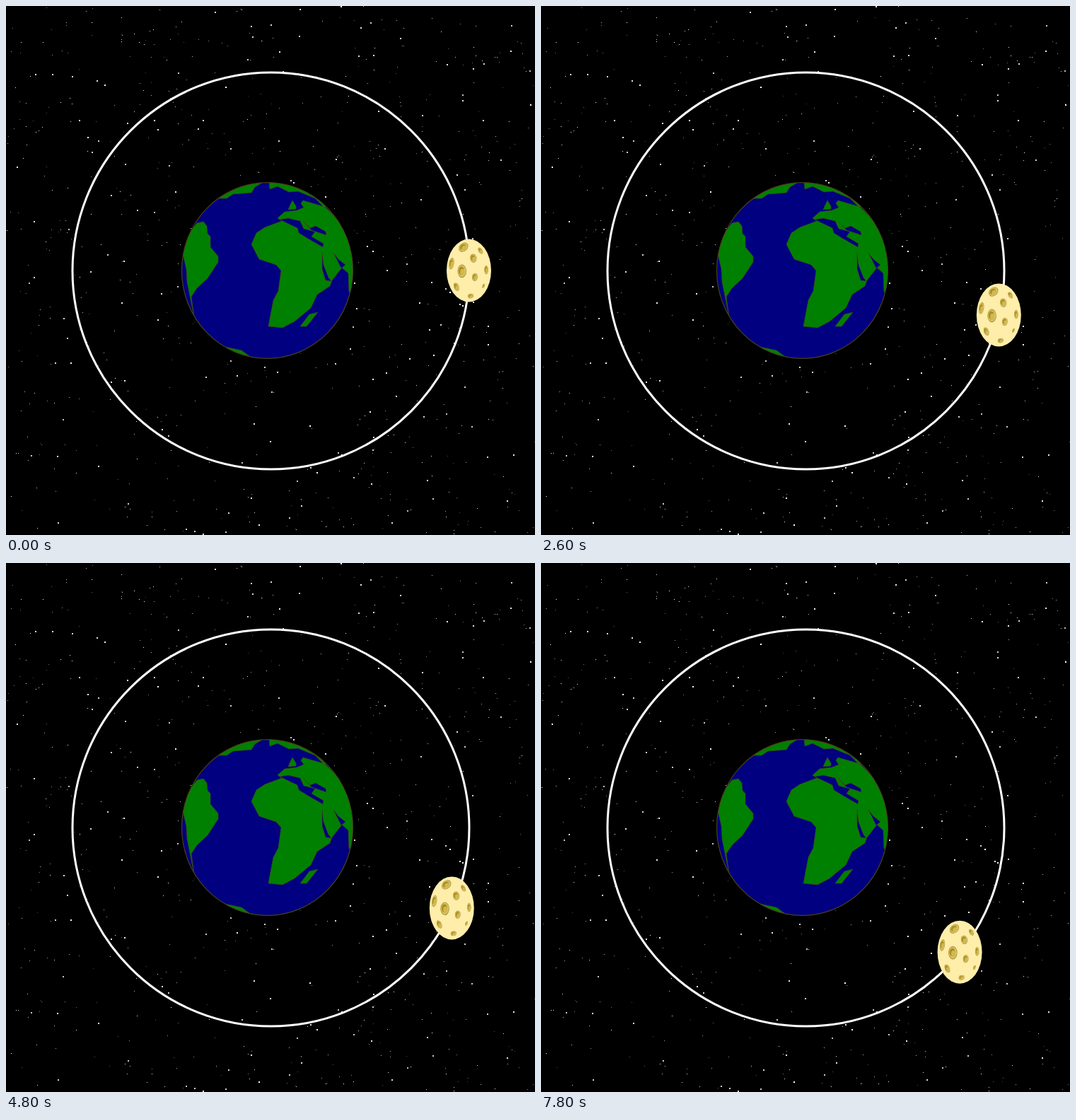
These frames come from a looping animation (748x748 px, 8000 ms). An HTML page:

```html
<!DOCTYPE html>
<html lang="en">
<head>
<meta charset="utf-8">
<title>Moon orbit</title>
<style>
  html, body { margin: 0; width: 100%; height: 100%; overflow: hidden; background: #000; }
  svg { display: block; width: 100vw; height: 100vh; }
  .land, .sea { stroke: #4a4018; stroke-width: .7; stroke-linejoin: round; }
  .land { fill: #008000; }
  .sea { fill: #000080; }
</style>
</head>
<body>
<svg viewBox="0 0 748 748">
  <defs>
    <clipPath id="globe"><ellipse cx="369.5" cy="374" rx="121" ry="124.5"/></clipPath>
  </defs>
  <g id="stars" fill="#fff"></g>
  <circle cx="374.5" cy="374.5" r="280.5" fill="none" stroke="#fff" stroke-width="3"/>

  <g clip-path="url(#globe)">
    <rect x="248" y="249" width="243" height="250" fill="#000080"/>
    <g class="land">
      <!-- Africa, Europe and Asia -->
      <path d="M354 321L347 337 358 358 382 366 389 374 385 403 378 416 371 453 391 455 408 446 431 427 440 408 458 396 461 388 475 370 484 378 485 404H496V330L451 284 420 275 417 279 421 285 411 289 394 291 384 300 390 304 366 313Z"/>
      <!-- South America -->
      <path d="M270 307L279 305 284 311 285 322 289 326 289 341 300 354 300 362 285 385 270 399 262 411 266 440 256 390 255 372 250 350 244 340Z"/>
      <!-- Arctic and Scandinavia -->
      <path d="M292 276L302 272 312 272 321 266 347 264 352 256 362 250V240H290Z"/>
      <path d="M372 248L373 259 384 255 400 263 413 262 437 272 450 285 458 280 420 240Z"/>
      <!-- Britain, Madagascar, Antarctica -->
      <path d="M405 275L402 281 399 288 410 287 410 283Z"/>
      <path d="M416 453L429 436 441 433 425 453Z"/>
      <path d="M305 481L333 487 344 495 330 505Z"/>
    </g>
    <g class="sea">
      <!-- Mediterranean, Black Sea, Red Sea, Persian Gulf -->
      <path d="M387 302L399 300 416 304 421 315 437 319 432 326 449 336 448 341 427 329 414 321 412 314 391 304Z"/>
      <path d="M420 304L430 314 438 311 452 319 453 324 432 317Z"/>
      <path d="M447 349L449 366 456 384 460 389 452 388 447 372Z"/>
      <path d="M463 349L470 358 480 366 474 371Z"/>
    </g>
  </g>
  <ellipse cx="369.5" cy="374" rx="121" ry="124.3" fill="none" stroke="#4a4018" stroke-width="1.2"/>

  <g id="moon"></g>
</svg>
<script>
const stars = document.getElementById('stars');
const moon = document.getElementById('moon');
const add = (parent, name, attrs) => {
  const node = document.createElementNS(parent.namespaceURI, name);
  for (const key in attrs) node.setAttribute(key, attrs[key]);
  return parent.appendChild(node);
};

let seed = 2024;
const random = () => (seed = seed * 16807 % 2147483647) / 2147483647;

function scatter(count, size, minOpacity) {
  for (let i = 0; i < count; i++) {
    add(stars, 'rect', {
      x: Math.floor(random() * 748), y: Math.floor(random() * 748),
      width: size, height: size,
      opacity: minOpacity + random() * (1 - minOpacity)
    });
  }
}
scatter(650, 1, .25);
scatter(170, 2, .75);

// The moon is a unit sphere squeezed into an ellipse; craters flatten towards its rim.
const face = add(moon, 'g', { transform: 'scale(31.5 44.5)' });
add(face, 'circle', { r: 1, fill: '#ffedaa' });

function crater(x, y, size) {
  const distance = Math.hypot(x, y);
  const tilt = Math.atan2(y, x) * 180 / Math.PI;
  const flat = Math.sqrt(1 - distance ** 2);
  const pit = add(face, 'g', {
    transform: `translate(${x} ${y}) rotate(${tilt}) scale(${size * flat} ${size}) rotate(${-tilt})`
  });
  add(pit, 'circle', { r: 1, fill: '#a89344' });
  add(pit, 'circle', { r: .88, fill: '#d9c565' });
  add(pit, 'circle', { cx: -.1, cy: -.05, r: .64, fill: '#a98c1c' });
  add(pit, 'circle', { cx: .12, cy: .15, r: .5, fill: '#d0b94e' });
}
crater(-.24, -.74, .22);
crater(.52, -.63, .13);
crater(.2, -.39, .15);
crater(-.78, -.22, .19);
crater(-.31, .02, .21);
crater(.78, -.02, .14);
crater(.27, .21, .13);
crater(-.56, .52, .15);
crater(.66, .49, .08);
crater(.08, .81, .13);

// The moon advances one degree every 200 ms.
const start = performance.now();
function draw() {
  const step = Math.floor((performance.now() - start) % 8000 / 200);
  const angle = step * Math.PI / 180;
  const x = 374.5 + 280 * Math.cos(angle);
  const y = 374 + 280 * Math.sin(angle);
  moon.setAttribute('transform', `translate(${x} ${y})`);
  requestAnimationFrame(draw);
}
draw();
</script>
</body>
</html>
```
